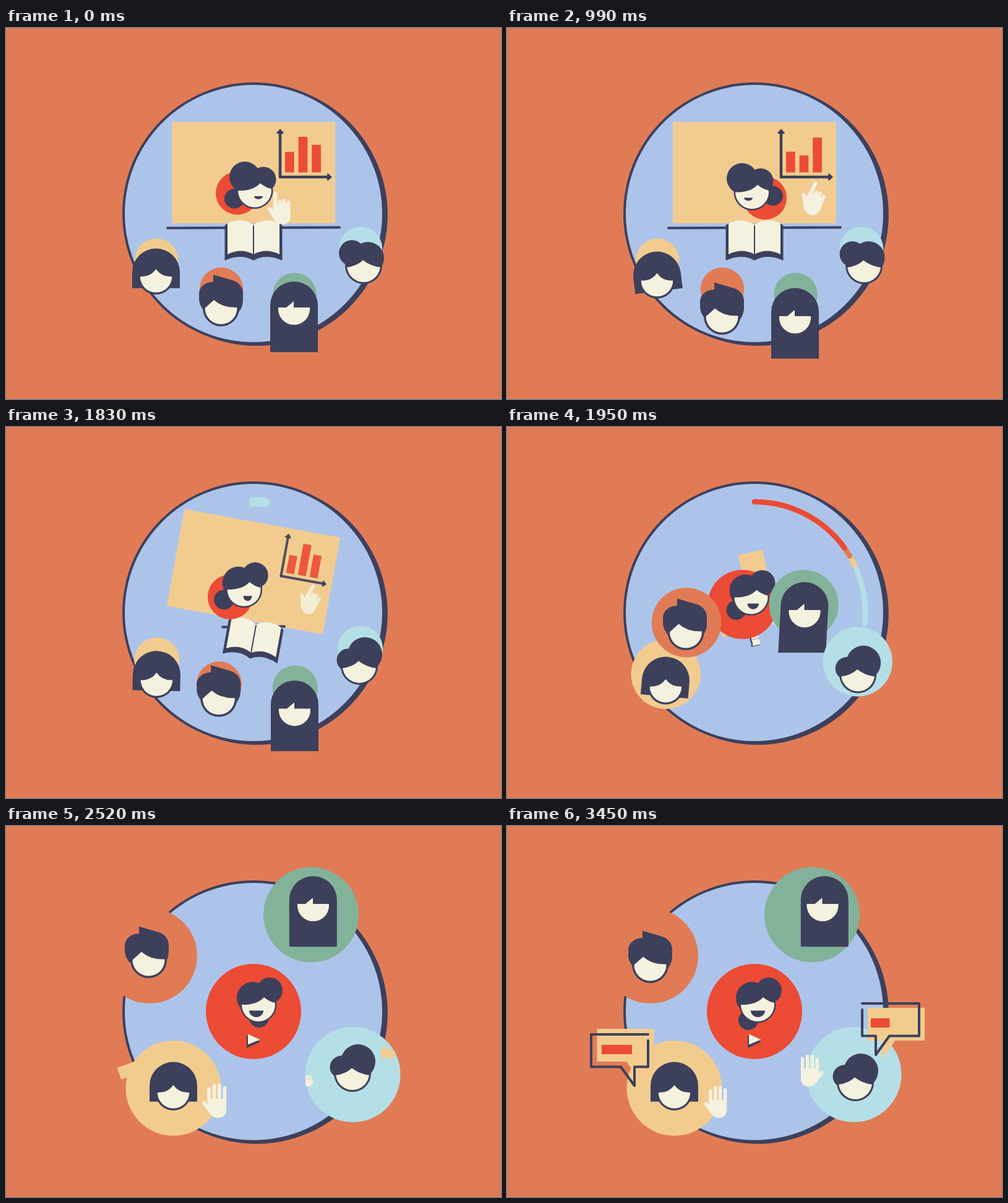
Recreate the animation shown at these times as an HTML page with a canvas. Size 800 by 600 pixels, loop 4200 ms.

```html
<!DOCTYPE html>
<html lang="en">
<head>
<meta charset="utf-8">
<title>Classroom to network</title>
<style>
html, body { margin: 0; width: 800px; height: 600px; overflow: hidden; background: #e17b56; }
canvas { display: block; }
</style>
</head>
<body>
<canvas id="stage" width="800" height="600"></canvas>
<script>
const g = document.getElementById('stage').getContext('2d');
const LOOP = 4200, STEP = 30, LAST = 3450, { PI, sin, cos } = Math;
const BG = '#e17b56', BLUE = '#adc4ea', INK = '#3d405b', CREAM = '#f4f1de';
const SAND = '#f2cc8f', RED = '#ec4b35', GREEN = '#83b29a', CYAN = '#b5dfe7';

// Timing: part is linear 0..1, ease is its smooth form, pulse goes up and back
const clamp = v => Math.max(0, Math.min(1, v));
const part = (t, a, b) => clamp((t - a) / (b - a));
const ease = (t, a, b) => (1 - cos(PI * part(t, a, b))) / 2;
const pulse = (t, a, b) => sin(PI * part(t, a, b)) ** 2;
const quart = p => p < .5 ? 8 * p ** 4 : 1 - 8 * (1 - p) ** 4;
const lerp = (a, b, p) => a + (b - a) * p;
const mix = (a, b, p) => a.map((v, i) => lerp(v, b[i], p));

// Shared motions
const move = t => quart(part(t, 1710, 2190));
const turn = t => ease(t, 560, 920) - ease(t, 1150, 1600);
const fade = t => part(t, 1720, 1830);
const nod = (t, times) => sin(PI * Math.max(0, Math.min(times, (t - 2210) / 620))) ** 2;

// Drawing helpers
function disc(color, x, y, r) {
  g.fillStyle = color;
  g.beginPath();
  g.arc(x, y, r, 0, 7);
  g.fill();
}
function shape(color, d) {
  g.fillStyle = color;
  g.fill(new Path2D(d));
}
function rect(color, x, y, w, h) {
  g.fillStyle = color;
  g.fillRect(x, y, w, h);
}
function line(color, width, x1, y1, x2, y2) {
  g.strokeStyle = color;
  g.lineWidth = width;
  g.beginPath();
  g.moveTo(x1, y1);
  g.lineTo(x2, y2);
  g.stroke();
}
function at(x, y, draw, rot = 0, sx = 1, sy = sx) {
  if (Math.abs(sx) < .002) return;
  g.save();
  g.translate(x, y);
  g.rotate(rot * PI / 180);
  g.scale(sx, sy);
  draw();
  g.restore();
}
// Skin shows below the fringe, a path running from left to right
function face(rim, r, fringe) {
  disc(INK, 0, 0, rim);
  g.save();
  g.clip(new Path2D(fringe + 'V40 H-40Z'));
  disc(CREAM, 0, 0, r);
  g.restore();
}

function backdrop() {
  rect(BG, 0, 0, 800, 600);
  disc(INK, 400, 300, 212);
  disc(INK, 404.8, 302, 212);
  disc(BLUE, 400, 300, 208);
}

function ring(t) {
  const tail = part(t, 1980, 2140) ** 2;
  g.lineWidth = lerp(15, 7, ease(t, 1830, 2000));
  [CYAN, SAND, BG, RED].forEach((color, i) => {
    const start = i ? 1840 : 1790;
    const head = part(t, start, i ? 2087 + 12 * i : 2100) ** 2;
    if (head <= tail) return;
    g.strokeStyle = color;
    g.beginPath();
    g.arc(400, 300, 179, (tail - .25) * 2 * PI, (head - .25) * 2 * PI);
    g.stroke();
  });
}

function spokes(t, spots) {
  const from = part(t, 2080, 2190), to = ease(t, 1890, 2040);
  if (to <= from) return;
  for (const [color, x, y] of spots) {
    line(color, 9, lerp(400, x, from), lerp(300, y, from), lerp(400, x, to), lerp(300, y, to));
  }
}

function chart(t) {
  const bars = [
    37.5 - 4.5 * cos(2 * PI * t / 920),
    57.5 - 31 * sin(PI * t / 1840) ** 4,
    46.5 - 10 * sin(2 * PI * t / 1320 + .2)
  ];
  bars.forEach((h, i) => rect(RED, -34 + 21.6 * i, 31.5 - h, 14.7, h));
  line(INK, 4.5, -42, -33, -42, 39);
  line(INK, 4.5, -42, 39, 37, 39);
  shape(INK, 'M-42 -39 L-36.5 -33 V-31 H-47.5 V-33Z M42 39 L36 44.5 H34 V33.5 H36Z');
}

function lesson(t) {
  const k = fade(t), out = ease(t, 1830, 2010);
  const rot = 10.3 * ease(t, 1350, 1620) + 90 * out, size = (1 - .03 * k) * (1 - out);
  at(400, 234, () => {
    rect(SAND, -132, -82, 264, 164);
    g.globalAlpha = 1 - .1 * k;
    at(85, -32 - 5 * k, () => chart(t), 0, 1 - .08 * k);
  }, rot, size);
  const half = 139 * (1 - ease(t, 1700, 1920));
  if (half > 0) line(INK, 4, 400 - half, 323.4, 400 + half, 322.6);
  at(400, 343, () => {
    shape(INK, 'M-46.5 -24 L-42 -27 H42 L46.5 -24 V33 Q20 21 0 33 Q-20 21 -46.5 33Z');
    shape(BLUE, 'M-42 -27 Q-20 -38 0 -25 Q20 -38 42 -27Z');
    shape(CREAM, 'M0 -25 Q-20 -38 -42 -27 V23 Q-20 12 0 23 Q20 12 42 23 V-27 Q20 -38 0 -25Z');
    line(INK, 2, 0, -23, 0, 22);
  }, rot, size);
}

function pointer(t) {
  const reach = ease(t, 0, 360), k = fade(t);
  at(444 + 49 * reach - 4 * k, 300 - 16 * reach + 2 * k, () => {
    g.globalAlpha = 1 - .1 * k;
    shape(CREAM, 'M-12.3 -6 L-12 -32 A3 3 0 0 1 -6 -32 L-5 -14 L-4 -20 A2.7 2.7 0 0 1 1.4 -20 L1.8 -15 L2.4 -21 ' +
      'A2.7 2.7 0 0 1 7.8 -21 L8 -14 L9.5 -18 A2.8 2.8 0 0 1 15.2 -18 L16 5 C16 14 9 18 3 17.5 C-3 17 -8 15 -11 9 ' +
      'L-20.5 -5.5 A3 3 0 0 1 -16 -9.5Z');
  }, 30 * reach - 5 * turn(t), (1 - .12 * k) * (1 - ease(t, 1830, 1950)));
}

function teacher(t, e) {
  const side = turn(t), up = ease(t, 1150, 1600), swing = nod(t, 2);
  disc(RED, ...mix([374 + 43 * side - 13 * up, 267 + 8 * side + 7 * up, 35], [400, 300, 77], e));

  const [x, y, bx, by] = mix(
    [402 - 6 * side - 18 * up, 263 + 2.5 * side - up, -33 + 67 * side, 13 - 7 * side + 3 * up],
    [405 + 3 * swing, 289, -15 + 16 * swing, 25 - 4 * swing], e);
  const [lx, ly, lr, rx, ry, rr] = mix([-16, -22, 25, 14, -18, 20.5], [-9, -11, 26, 18, -23, 21], up);

  // Talking rounds the mouth; otherwise it is a smile
  const round = t < 560 ? sin(PI * t / 280) ** 2 : 0;
  const [mx, my, w, smile] = mix([6 - 12 * side, 9 + 1.5 * up, 7 - 1.5 * round, 5 + 2 * round + 3 * up],
    [.5 - 4 * swing, 9.5, 11.5, 10.5], e);
  at(x, y, () => {
    disc(INK, bx, by, 16);
    disc(INK, lx, ly, lr);
    disc(INK, rx, ry, rr);
    face(29.5, 27, 'M-40 0 H-27 Q-3 1 9 -12 Q17 -5 27 -3 H40');
    shape(INK, `M${mx - w} ${my} A${w} ${7 * round} 0 0 1 ${mx + w} ${my} A${w} ${smile} 0 0 1 ${mx - w} ${my}Z`);
  });

  const pop = ease(t, 1950, 2100);
  at(399, 347, () => {
    shape(INK, 'M-10 -9 V12 L12 2Z');
    shape(CREAM, 'M-8 -10.5 L11.5 -1.5 L-8 6.5Z');
  }, 40 * (1 - pop) + 7 * pulse(t, 1950, 2190), pop);
}

function bob(t, e) {
  const drop = ease(t, 0, 990);
  const [x, y, hy] = mix([242.5, 402 + 6.5 * drop, -1.5 * drop], [270.5, 431, -4], e);
  const tilt = 6 * pulse(t, 0, 1000) - 7 * pulse(t, 700, 1280) + 7 * pulse(t, 1740, 2400);
  at(x, y, () => {
    at(0, hy - 7, () => shape(INK, 'M-38.5 0 A38.5 38.5 0 0 1 38.5 0 V25.7 H-38.5Z'), tilt);
    face(29, 25.7, 'M-40 0 H-26 Q-9 1 0 -12 Q9 1 26 0 H40');
  });
}

function quiff(t, e) {
  const lift = t < 2520 ? 1 : nod(t, 2);
  const [x, y, hx, hy] = mix(
    [347.5, 453 + 13.5 * ease(t, 0, 640) - 20 * ease(t, 1050, 1500), 0, -3.5 * pulse(t, 0, 1200)],
    [231.5 - lift, 224.5 - 8 * lift, -3 * lift, lift - 1], e);
  at(x, y, () => {
    at(hx, hy, () => shape(INK, 'M-12.5 -54 L20 -44.5 C30 -41 35.5 -33 35.5 -24 V-14 C35.5 -6 33 1 29 6 L-28 4 ' +
      'C-33 -3 -35.5 -8 -35.5 -16 V-22 C-35.5 -34 -26 -42 -12.5 -42.5Z'));
    face(29.5, 26, 'M-40 4 L-26 0 L-11.5 -13 Q3 0 26 -1 H40');
  });
}

function longHair(t, e) {
  const rise = pulse(t, 0, 840), sink = ease(t, 500, 900), slide = ease(t, 2720, 3000);
  const [hx, top, fx, fy] = mix(
    [465.5, 410 - 6.5 * rise + 10.5 * sink, 465.5, 454.5 - 13.5 * rise + 14 * sink],
    [496.3 + 17 * slide, 81, 496.5 + 13.5 * slide, 128.5], e);
  const sway = -9 * pulse(t, 1840, 2300);
  at(hx, top, () => shape(INK, `M-38.5 38.5 A38.5 38.5 0 0 1 38.5 38.5 L${38.5 + sway} 114.3 H${sway - 38.5}Z`));
  at(fx, fy, () => face(25, 25.6, 'M-40 -2.5 H-12.5 L-.5 -12.5 V-2.5 H40'));
}

function topKnot(t, e) {
  const shift = ease(t, 800, 1600), bow = nod(t, 1);
  const [x, y] = mix([578 - 6.7 * shift, 384 + 2 * shift], [563 - 3 * bow, 415 - 15 * bow], e);
  const [lx, ly, lr, rx, ry, rr] = mix([-19, -20, 21, 7, -12, 26], [-18, -10, 18.5, 9, -19, 28], shift);
  at(x, y, () => {
    disc(INK, lx, ly, lr);
    disc(INK, rx, ry, rr);
    face(30, 27, 'M-40 3 H-27 Q-11 1 -1 -8.5 Q11 1 27 3 H40');
  });
}

function palm() {
  shape(CREAM, 'M-14.5 -29 H14.5 V-13 C14.5 -4 9 0 2 0 C-4 0 -8 -3 -12 -8Z');
  for (let i = 0; i < 4; i++) {
    const x = -11.8 + 7.9 * i;
    line(CREAM, 5.4, x, -49.5 + 2.2 * (i - 1.6) ** 2, x, -26);
  }
  line(CREAM, 6, -18.8, -22.5, -8, -8);
}

function waves(t) {
  const rot = 9 * sin(3 * PI * part(t, 2640, 3200));
  const left = ease(t, 2330, 2520) + .07 * pulse(t, 2400, 2640), right = ease(t, 2440, 2630);
  at(340.7, 472, palm, rot, left);
  at(489.5, 421.5, palm, rot, -right, right);
}

function bubble(t, x, y, flip, start, width) {
  const grown = ease(t, start, 2740);
  at(x, y, () => shape(SAND, 'M-69.5 -84 H22.5 V-31 H0 V0 L-22 -31 H-69.5Z'), -32 * flip * (1 - grown), grown * flip, grown);
  rect(RED, flip > 0 ? 153 : 588, flip > 0 ? 354 : 311, width * part(t, 2800, 3200), 15);

  const drawn = ease(t, 2580, 2980), length = 326;
  if (!drawn) return;
  at(flip > 0 ? 0 : 802, flip > 0 ? 0 : -50, () => {
    g.strokeStyle = INK;
    g.lineWidth = 4;
    g.setLineDash([length * drawn, 999]);
    g.stroke(new Path2D('M228 337 H136 V389.5 H184 L206 420 V389.5 H228 V347'));
  }, 0, flip, 1);
}

// Each listener: colour, place in class, place in the network, head
const people = [
  [SAND, [243, 375.5, 35.3], [270.5, 424, 77], bob],
  [BG, [348, 422.5, 35.3], [232, 210, 77], quiff],
  [GREEN, [466.5, 431, 35.3], [493, 143.5, 77], longHair],
  [CYAN, [573, 357, 35.3], [560.5, 402, 77], topKnot]
];

function render(t) {
  const e = move(t);
  const spots = people.map(([color, seat, node]) => [color, ...mix(seat, node, e)]);
  g.lineCap = g.lineJoin = 'round';
  backdrop();
  ring(t);
  lesson(t);
  spokes(t, spots);
  teacher(t, e);
  pointer(t);
  spots.forEach((spot, i) => {
    disc(...spot);
    people[i][3](t, e);
  });
  bubble(t, 215, 412, 1, 2360, 49);
  bubble(t, 605.5, 378, -1, 2410, 30.5);
  waves(t);
}

const began = performance.now();
function tick() {
  const t = (performance.now() - began) % LOOP;
  render(Math.min(LAST, Math.floor(t / STEP) * STEP));
  requestAnimationFrame(tick);
}
tick();
</script>
</body>
</html>
```
